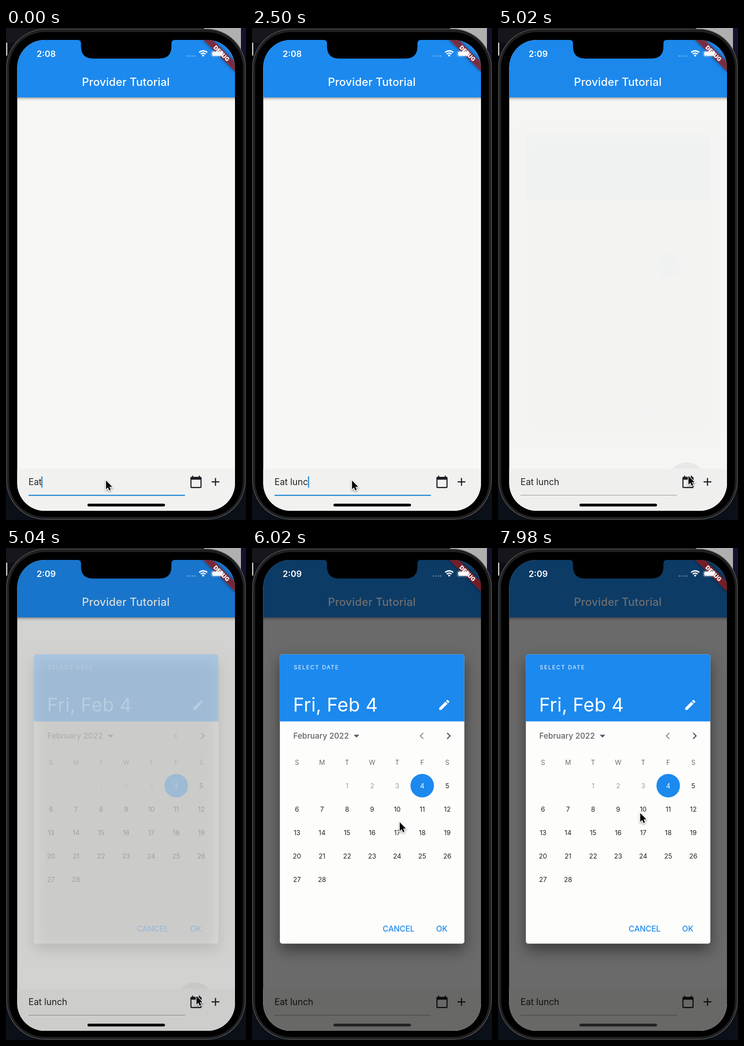
These frames come from a looping animation (523 px wide and 1071 px high, 8000 ms). An HTML page with a canvas:

```html
<!DOCTYPE html>
<html>
<head>
<meta charset="utf-8">
<title>Provider Tutorial</title>
<style>
html, body { margin: 0; width: 100%; height: 100%; overflow: hidden; background: #0b0b14; }
canvas { display: block; }
</style>
</head>
<body>
<canvas id="stage" width="523" height="1071"></canvas>
<script>
const ctx = document.getElementById('stage').getContext('2d');
const LOOP = 8000, SCALE = 1.218, BLUE = '#1c89ee', INK = '#1d1d22';
const TAP = 5020, OPEN_TIME = 150;

const icons = {
  calendar: 'M20 3h-1V1h-2v2H7V1H5v2H4c-1.1 0-2 .9-2 2v16c0 1.1.9 2 2 2h16c1.1 0 2-.9 2-2V5c0-1.1-.9-2-2-2zm0 18H4V8h16v13z',
  add: 'M19 13h-6v6h-2v-6H5v-2h6V5h2v6h6v2z',
  edit: 'M3 17.25V21h3.75L17.81 9.94l-3.75-3.75L3 17.25zM20.71 7.04c.39-.39.39-1.02 0-1.41l-2.34-2.34c-.39-.39-1.02-.39-1.41 0l-1.83 1.83 3.75 3.75 1.83-1.83z',
  left: 'M15.41 7.41L14 6l-6 6 6 6 1.41-1.41L10.83 12z',
  right: 'M10 6L8.59 7.41 13.17 12l-4.58 4.58L10 18l6-6z',
  down: 'M7 10l5 5 5-5z'
};
const arrow = new Path2D('M0 0V19L4.2 15L7 21.6L10.2 20.3L7.4 13.8H13.3Z');

const typed = [[300, 4], [820, 5], [1300, 6], [1800, 7], [2200, 8], [2620, 9]];
const mouse = [
  [0, 218, 985], [3100, 218, 985], [3760, 400, 976], [4050, 415, 975], [5120, 415, 975],
  [5460, 335, 864], [6000, 322, 597], [7200, 322, 597], [7700, 310, 577]
];

const clamp = v => Math.max(0, Math.min(1, v));
const ramp = (t, start, length) => clamp((t - start) / length);
const easeOut = p => 1 - (1 - p) ** 2;

function box(x, y, w, h, color, radius = 0) {
  ctx.fillStyle = color;
  ctx.beginPath();
  ctx.roundRect(x, y, w, h, radius);
  ctx.fill();
}

function disc(x, y, r, color) {
  ctx.fillStyle = color;
  ctx.beginPath();
  ctx.arc(x, y, r, 0, 7);
  ctx.fill();
}

// y is the middle of the capital letters
function text(s, x, y, size, color, weight = 400, align = 'left', spacing = 0) {
  ctx.font = `${weight} ${size}px Inter, "Liberation Sans", sans-serif`;
  ctx.letterSpacing = spacing + 'px';
  ctx.textAlign = align;
  ctx.fillStyle = color;
  ctx.fillText(s, x, y + size * 0.364);
  return ctx.measureText(s).width;
}

function icon(name, x, y, color) {
  ctx.save();
  ctx.translate(x, y);
  ctx.scale(SCALE, SCALE);
  ctx.translate(-12, -12);
  ctx.fillStyle = color;
  ctx.fill(new Path2D(icons[name]));
  ctx.restore();
}

function drawBody() {
  box(0, 0, 523, 1071, '#0a0f18');
  box(0, 0, 90, 32, '#17161c');
  box(0, 32, 3, 28, '#b9b5a8');
  box(432, 0, 80, 90, '#b0b0b0');
  box(512, 0, 11, 100, '#14122c');
  box(1.5, 2.5, 520, 1067, '#1d1d1d', 84);
  ctx.strokeStyle = '#555';
  ctx.lineWidth = 1.5;
  ctx.stroke();
  box(6, 8, 511, 1057, '#000', 79);
  ctx.strokeStyle = '#303030';
  ctx.lineWidth = 1;
  ctx.stroke();
}

function drawField(t, open) {
  const s = 'Eat lunch'.slice(0, (typed.findLast(k => t >= k[0]) || [0, 3])[1]);
  const end = 49 + text(s, 49, 988, 19.4, '#222');
  if (open > 0) {
    box(49, 1016.5, 341, 1, '#8c8c78');
    return;
  }
  box(49, 1016, 341, 2.4, '#2489d9');
  const phase = (t - 2920) % 1000;
  ctx.globalAlpha = t < 2920 ? 1 : phase < 500 ? 1 - ramp(phase, 0, 140) : ramp(phase, 500, 250);
  box(Math.round(end - 0.4), 976, 2.4, 24.5, '#2489d9');
  ctx.globalAlpha = 1;
}

function drawApp(t, open) {
  box(24, 26, 475, 1025, '#f7f7f6');
  const shade = ctx.createLinearGradient(0, 151, 0, 159);
  shade.addColorStop(0, 'rgba(0,0,0,.33)');
  shade.addColorStop(0.5, 'rgba(0,0,0,.1)');
  shade.addColorStop(1, 'rgba(0,0,0,0)');
  box(24, 151, 475, 8, shade);
  box(24, 26, 475, 125, BLUE);
  text('Provider Tutorial', 261, 117, 24, '#fff', 500, 'center', 0.15);

  const ripple = ramp(t, 4860, 150);
  if (ripple) disc(411, 988, 15 + 27.5 * ripple, `rgba(0,0,0,${0.05 * ripple * (1 - ramp(t, TAP, 250))})`);
  box(24, 959.5, 475, 92, '#f1f2f0');
  drawField(t, open);
  icon('calendar', 414, 988, INK);
  icon('add', 456.5, 988, INK);
}

function drawDialog() {
  ctx.save();
  ctx.shadowColor = 'rgba(0,0,0,.45)';
  ctx.shadowBlur = 32;
  ctx.shadowOffsetY = 14;
  box(60.75, 231.6, 402, 629.6, '#fdfdfc', 5);
  ctx.restore();
  box(60.75, 231.6, 402, 146, BLUE, [5, 5, 0, 0]);
  text('SELECT DATE', 91, 259.5, 12, '#fff', 400, 'left', 1.8);
  text('Fri, Feb 4', 89.5, 341, 41, '#fff', 400, 'left', 0.3);
  icon('edit', 419, 341.5, '#fff');
  text('February 2022', 90, 409, 17, '#606064', 500, 'left', 0.1);
  icon('down', 227.7, 409, '#56566a');
  icon('left', 370, 409, '#96969c');
  icon('right', 428.5, 409, '#56566a');

  const column = i => 98 + 54.6 * i;
  [...'SMTWTFS'].forEach((d, i) => text(d, column(i), 466.5, 14.2, '#6c6c6c', 400, 'center'));
  disc(370.9, 517.4, 25.6, BLUE);
  for (let day = 1; day <= 28; day++) {
    const cell = day + 1;
    const color = day < 4 ? '#9c9c9c' : day === 4 ? '#fff' : '#222';
    text(day, column(cell % 7), 517.5 + 51 * Math.floor(cell / 7), 14.4, color, 400, 'center');
  }
  text('CANCEL', 319.5, 829, 17, BLUE, 500, 'center');
  text('OK', 413.5, 829, 17, BLUE, 500, 'center');
}

function drawBanner() {
  ctx.save();
  ctx.translate(499, 26);
  ctx.rotate(Math.PI / 4);
  ctx.filter = 'blur(3.5px)';
  box(-49, 34, 98, 14.7, 'rgba(0,0,0,.5)');
  ctx.filter = 'none';
  box(-49, 34, 98, 14.7, 'rgba(183,28,28,.63)');
  text('DEBUG', 0, 41.4, 12.4, '#fff', 900, 'center');
  ctx.restore();
}

function drawStatus(t) {
  text(t <= TAP ? '2:08' : '2:09', 87.5, 56.5, 18.6, '#fff', 600, 'center');
  for (let i = 0; i < 4; i++) disc(395 + 5.5 * i, 61, 1.7, 'rgba(255,255,255,.33)');
  ctx.strokeStyle = '#fff';
  ctx.lineWidth = 2.9;
  for (const r of [2.5, 7.4, 12.3]) {
    ctx.beginPath();
    ctx.arc(429.7, 62, r, -Math.PI * 0.75, -Math.PI * 0.25);
    ctx.stroke();
  }
  disc(429.7, 60.7, 1.6, '#fff');
  ctx.lineWidth = 1.2;
  ctx.strokeStyle = 'rgba(255,255,255,.45)';
  ctx.beginPath();
  ctx.roundRect(447.5, 49.5, 26, 13, 4);
  ctx.stroke();
  box(449.3, 51.2, 22.4, 9.6, '#fff', 2.4);
  box(475, 54, 1.8, 4.5, 'rgba(255,255,255,.5)', 1);
}

function drawNotch() {
  ctx.fillStyle = '#000';
  ctx.fill(new Path2D('M156 25V26Q163.500 26 163.500 33.500V40Q163.500 66.500 190 66.500H334Q360.500 66.500 360.500 40V33.500Q360.500 26 368 26V25Z'));
}

function drawMouse(t) {
  const i = mouse.findLastIndex(k => t >= k[0]);
  const a = mouse[i], b = mouse[i + 1] || a;
  const p = b === a ? 0 : (t - a[0]) / (b[0] - a[0]);
  ctx.save();
  ctx.translate(a[1] + (b[1] - a[1]) * p, a[2] + (b[2] - a[2]) * p);
  ctx.shadowColor = 'rgba(0,0,0,.4)';
  ctx.shadowBlur = 4;
  ctx.shadowOffsetY = 2;
  ctx.strokeStyle = '#fff';
  ctx.lineWidth = 2.6;
  ctx.stroke(arrow);
  ctx.shadowColor = 'transparent';
  ctx.fillStyle = '#000';
  ctx.fill(arrow);
  ctx.restore();
}

function draw(now) {
  const t = now % LOOP;
  const open = easeOut(ramp(t, TAP, OPEN_TIME));
  drawBody();
  ctx.save();
  ctx.beginPath();
  ctx.roundRect(24.5, 26, 474.5, 1025, 60);
  ctx.clip();
  drawApp(t, open);
  if (open > 0) {
    box(24, 26, 475, 1025, `rgba(0,0,0,${0.57 * open})`);
    ctx.globalAlpha = open;
    drawDialog();
    ctx.globalAlpha = 1;
  }
  drawBanner();
  drawStatus(t);
  const bar = Math.round(34 * open);
  box(177.5, 1035.5, 169, 6, `rgb(${bar},${bar},${bar})`, 3);
  ctx.restore();
  drawNotch();
  drawMouse(t);
}

const start = performance.now();
function frame() {
  draw(performance.now() - start);
  requestAnimationFrame(frame);
}
frame();
</script>
</body>
</html>
```
